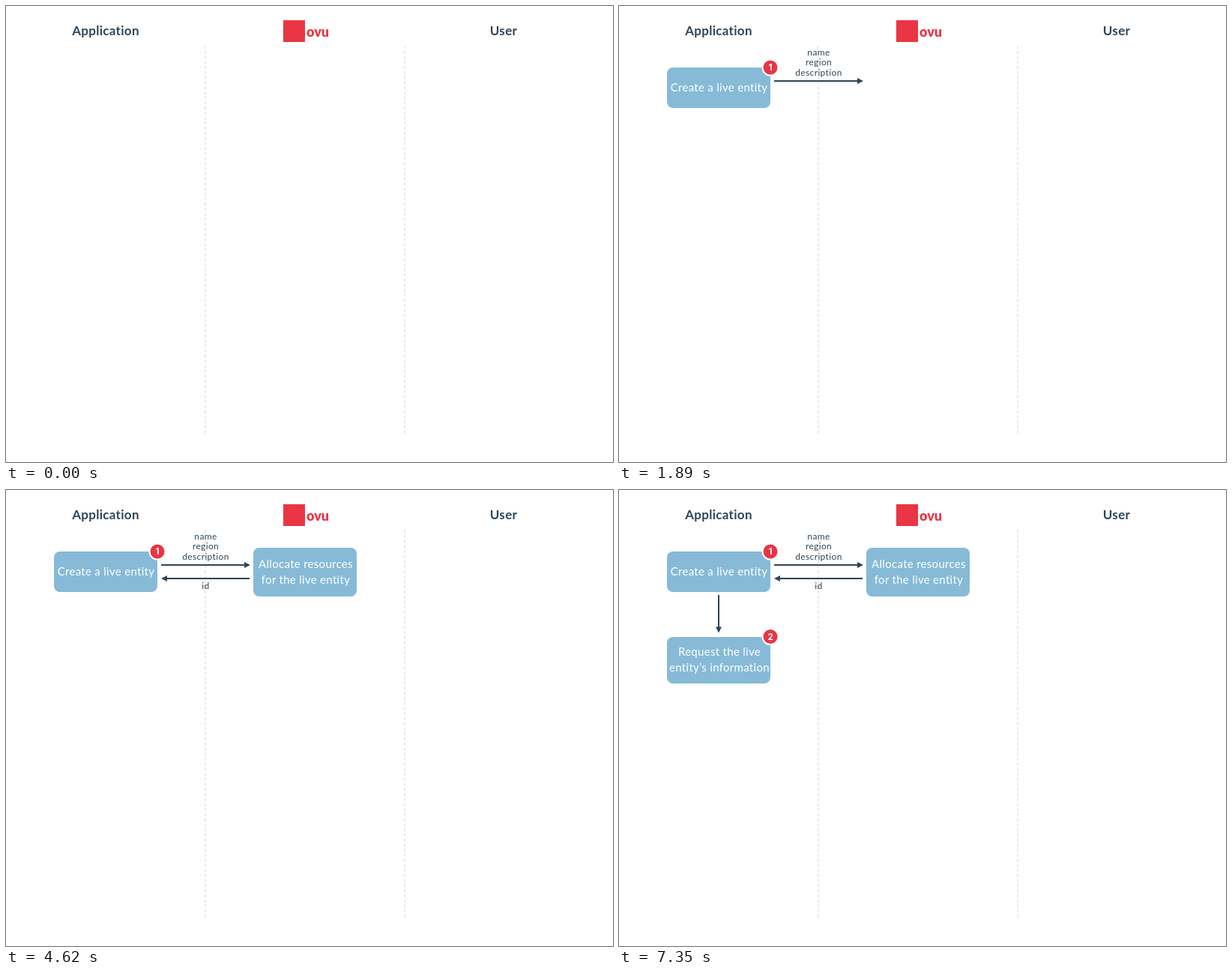
Animation of 810 by 608 pixels, one loop 8 s. Source, as an HTML page:

```html
<!DOCTYPE html>
<html lang="en">
<head>
<meta charset="utf-8">
<title>Live entity flow</title>
<style>
  html, body { margin: 0; width: 100%; height: 100%; overflow: hidden; background: #fff; }
  svg { display: block; width: 810px; height: 608px; }
  text { font-family: Lato, "Open Sans", sans-serif; text-anchor: middle; }
  .head { font-size: 17px; font-weight: 700; letter-spacing: .3px; fill: #2d475a; }
  .box text { font-size: 15px; letter-spacing: .3px; fill: #fff; }
  .box rect { fill: #86bad7; }
  .badge circle { fill: #e93544; stroke: #fff; stroke-width: 2; }
  .badge text { font: 700 11.5px Inter, "Open Sans", sans-serif; fill: #fff; }
  .note { font-size: 12px; letter-spacing: .35px; fill: #2c4558; }
  .arrow { fill: #2c4558; }
  .lane { stroke: #e3e3e3; stroke-width: 1.5; stroke-dasharray: 4 2.75; }
  .brand { font-size: 18px; font-weight: 900; text-anchor: start; }
</style>
</head>
<body>
<svg id="stage" viewBox="0 0 810 608">
  <path class="lane" d="M266 53V571M532 53V571"/>
  <text class="head" x="133" y="39">Application</text>
  <text class="head" x="664" y="39">User</text>
  <g fill="#e93544">
    <rect x="370" y="19" width="29" height="29"/>
    <text class="brand" x="401" y="41">ovu</text>
  </g>
</svg>
<script>
const LOOP = 8000, STEP = 70, POP = 400, WIPE = 455;
const stage = document.getElementById('stage');
const parts = [];

function add(parent, tag, attrs, text) {
  const el = document.createElementNS('http://www.w3.org/2000/svg', tag);
  for (const key in attrs) el.setAttribute(key, attrs[key]);
  if (text) el.textContent = text;
  parent.append(el);
  return el;
}

const clamp = v => Math.min(1, Math.max(0, v));
const smooth = p => p * p * (3 - 2 * p);

// Grows past full size while fading in, then settles.
function pop(el, cx, cy, start) {
  parts.push(t => {
    const p = clamp((t - start) / POP);
    const rise = clamp(p / 0.8);
    const settle = 1 - clamp((p - 0.8) / 0.2);
    const scale = p < 0.8 ? 1.13 * rise : 1 + 0.13 * Math.pow(settle, 1.3);
    el.setAttribute('opacity', rise);
    el.setAttribute('transform',
      `translate(${cx} ${cy}) scale(${scale}) translate(${-cx} ${-cy})`);
  });
}

// Uncovers a group inside its box from one side.
function wipe(id, [x, y, w, h], side, start) {
  const clip = add(add(stage, 'clipPath', { id }), 'rect', { x, y, width: w, height: h });
  parts.push(t => {
    const p = smooth(clamp((t - start) / WIPE));
    clip.setAttribute(side === 'down' ? 'height' : 'width', (side === 'down' ? h : w) * p);
    if (side === 'left') clip.setAttribute('x', x + w * (1 - p));
  });
  return add(stage, 'g', { 'clip-path': `url(#${id})` });
}

function box(x, y, w, h, lines, start) {
  const g = add(stage, 'g', { class: 'box' });
  add(g, 'rect', { x, y, width: w, height: h, rx: 8 });
  lines.forEach(([tx, ty, text]) => add(g, 'text', { x: tx, y: ty }, text));
  pop(g, x + w / 2, y + h / 2, start);
}

function badge(x, y, label, start) {
  const g = add(stage, 'g', { class: 'badge' });
  add(g, 'circle', { cx: x, cy: y, r: 10.5 });
  add(g, 'text', { x, y: y + 4.2 }, label);
  pop(g, x, y, start);
}

function arrow(parent, x, y, length, angle) {
  add(parent, 'path', {
    class: 'arrow',
    d: `M0 -1H${length - 8}V-4L${length} 0L${length - 8} 4V1H0Z`,
    transform: `translate(${x} ${y}) rotate(${angle})`
  });
}

function notes(parent, list) {
  list.forEach(([y, text]) => add(parent, 'text', { class: 'note', x: 266.5, y }, text));
}

box(64, 82, 138, 54, [[133.5, 114, 'Create a live entity']], 124);
badge(202, 82, '1', 124);

const send = wipe('send', [206, 52, 121, 54], 'right', 1425);
arrow(send, 207, 100, 119, 0);
notes(send, [[66, 'name'], [79, 'region'], [93, 'description']]);

box(330, 77, 138, 65,
  [[400, 104, 'Allocate resources'], [400, 125, 'for the live entity']], 2854);

const reply = wipe('reply', [206, 112, 120, 24], 'left', 4155);
arrow(reply, 325, 118, 118, 180);
notes(reply, [[132, 'id']]);

const next = wipe('next', [127, 139, 12, 52], 'down', 5515);
arrow(next, 133, 140, 50.5, 90);

box(64, 196, 138, 62,
  [[134, 221, 'Request the live'], [134, 242, 'entity’s information']], 6945);
badge(202, 195.5, '2', 6945);

const origin = performance.now();
function draw(now) {
  const t = Math.max(0, now - origin) % LOOP;
  const held = Math.floor(t / STEP) * STEP;
  parts.forEach(update => update(held));
  requestAnimationFrame(draw);
}
draw(origin);
</script>
</body>
</html>
```
